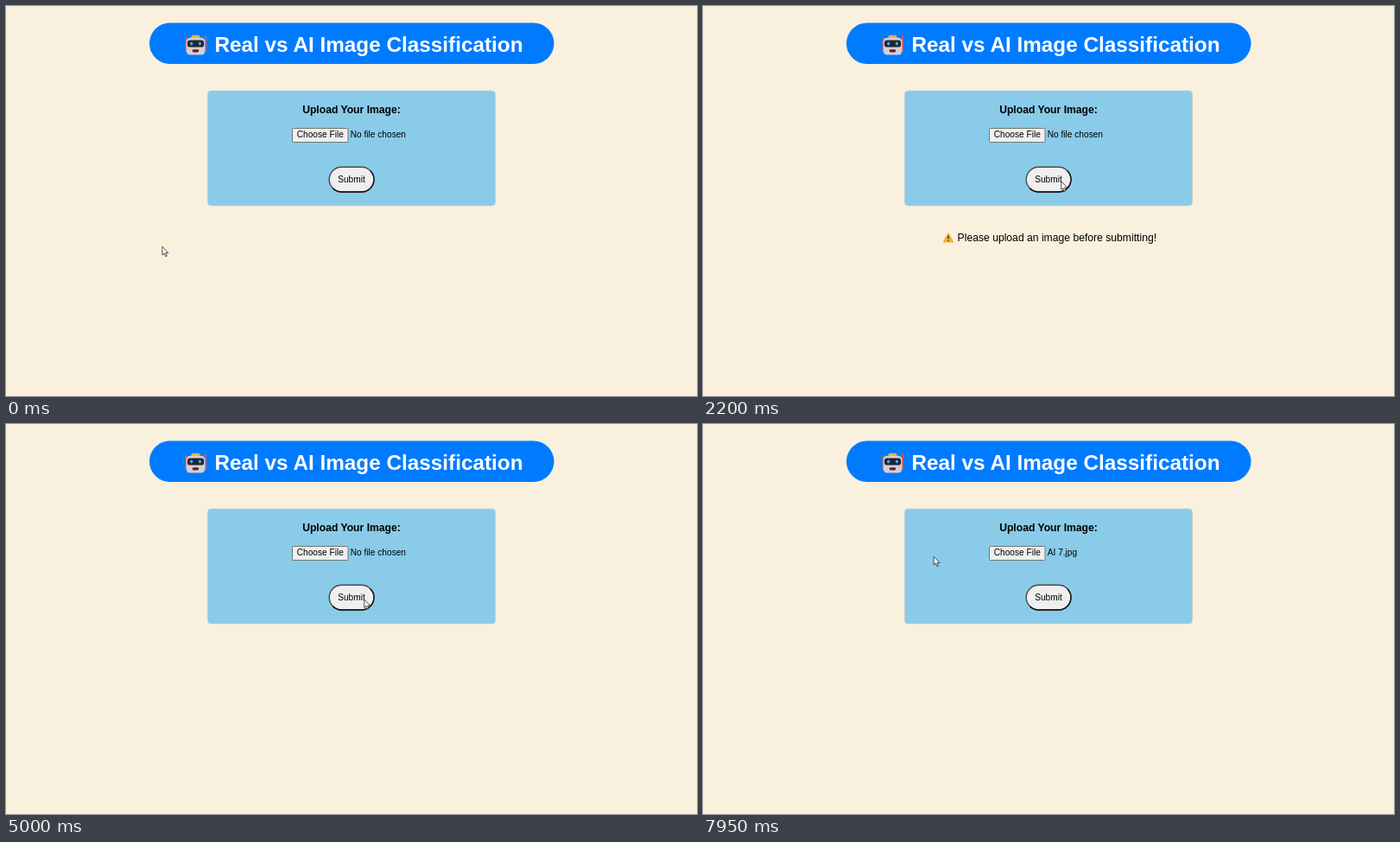
Recreate the animation shown at these times as an HTML page. Size 800x451 px, loop 8 s.

```html
<!DOCTYPE html>
<html lang="en">
<head>
<meta charset="utf-8">
<title>Image upload</title>
<style>
  html, body { margin: 0; width: 100%; height: 100%; overflow: hidden; background: #faf0de; }
  svg { display: block; width: 100vw; height: 100vh; }
  text { font-family: "Liberation Sans", Arial, sans-serif; font-size: 10.13px; }
  .title { font-size: 24.32px; font-weight: bold; fill: #fff; }
  .label { font-size: 12.16px; font-weight: bold; }
  .note { font-size: 12.16px; }
  .mid { text-anchor: middle; }
</style>
</head>
<body>
<svg viewBox="0 0 800 451">
  <rect width="800" height="451" fill="#faf0de"/>

  <rect x="166" y="19.5" width="468.5" height="47.5" rx="23.75" fill="#007bff"/>
  <g id="robot">
    <path d="M208.6 37V52M231 35V52" stroke="#e8574a" stroke-width="1.8" stroke-linecap="round"/>
    <rect x="214.5" y="33.7" width="10" height="5" rx="2" fill="#f9b13c"/>
    <rect x="208.8" y="36.8" width="21.6" height="19.8" rx="4.5" fill="#d5cfd6"/>
    <rect x="210" y="39.6" width="19.2" height="8" rx="3.2" fill="#1d2534"/>
    <ellipse cx="214.7" cy="43.5" rx="1.6" ry="2.1" fill="#48a9e0"/>
    <ellipse cx="224.5" cy="43.5" rx="1.6" ry="2.1" fill="#48a9e0"/>
    <rect x="215.8" y="50.2" width="7.4" height="3.2" rx="1.4" fill="#6e2029"/>
  </g>
  <text class="title" x="241.4" y="53.2">Real vs AI Image Classification</text>

  <rect x="233.6" y="98.1" width="332.8" height="132.8" rx="3.6" fill="#89cbe9" stroke="#c3cdca" stroke-width=".8"/>
  <text class="label mid" x="400" y="124.4">Upload Your Image:</text>

  <rect id="choose" x="331.5" y="141.5" width="64.5" height="16" rx=".8" fill="#efefef" stroke="#767676"/>
  <text class="mid" x="363.8" y="152.4">Choose File</text>
  <text id="file" x="398.8" y="152.4">No file chosen</text>

  <rect x="374.2" y="186.2" width="51.8" height="28.8" rx="14.4" fill="#efefef" stroke="#4c4c4c" stroke-width="1.4"/>
  <path d="M421.8 190.4A14.4 14.4 0 0 1 411.6 215H388.6A14.4 14.4 0 0 1 378.4 210.8" fill="none" stroke="#111" stroke-width="1.4"/>
  <text class="mid" x="400" y="204">Submit</text>

  <g id="warning">
    <path d="M284 263.2L289.3 272.8H278.7Z" fill="#f8b02f" stroke="#f8b02f" stroke-width="1.6" stroke-linejoin="round"/>
    <path d="M284 265.6V269.4M284 271V272.2" stroke="#3b2f2a" stroke-width="1.4"/>
    <text class="note" x="294.6" y="272">Please upload an image before submitting!</text>
  </g>

  <path id="cursor" d="M0 0V9.7L2.2 7.7L3.8 11.5L5.3 10.8L3.8 7.2H6.8Z" fill="#fff" stroke="#222" stroke-width=".8" stroke-linejoin="round"/>
</svg>
<script>
const LOOP = 8000;
const START = [181, 278.3];
const MOVES = [
  { from: 0, to: 250, point: [414.8, 202.8] },
  { from: 5200, to: 5500, point: [355.3, 148] },
  { from: 6850, to: 7200, point: [47, 147] },
  { from: 7850, to: 7950, point: [267.2, 153.3] }
];
const NOTE_SHOWN = 1600, FADE_FROM = 4050, FADE_TIME = 900, FILE_CHOSEN = 7400;

const [choose, file, warning, cursor] =
  ["choose", "file", "warning", "cursor"].map(id => document.getElementById(id));

const progress = (t, from, length) => Math.min(1, Math.max(0, (t - from) / length));
const smooth = p => p * p * (3 - 2 * p);

function cursorAt(t) {
  return MOVES.reduce((pos, { from, to, point }) => {
    const p = smooth(progress(t, from, to - from));
    return pos.map((v, i) => v + (point[i] - v) * p);
  }, START);
}

function render(t) {
  const [x, y] = cursorAt(t);
  cursor.setAttribute("transform", `translate(${x.toFixed(2)} ${y.toFixed(2)})`);

  const hover = x > 331 && x < 396.5 && y > 141 && y < 158;
  choose.setAttribute("fill", hover ? "#e5e5e5" : "#efefef");
  choose.setAttribute("stroke", hover ? "#4f4f4f" : "#767676");

  file.textContent = t < FILE_CHOSEN ? "No file chosen" : "AI 7.jpg";
  warning.setAttribute("opacity", t < NOTE_SHOWN ? 0 : 1 - smooth(progress(t, FADE_FROM, FADE_TIME)));
}

const began = performance.now();
function tick() {
  render((performance.now() - began) % LOOP);
  requestAnimationFrame(tick);
}
render(0);
requestAnimationFrame(tick);
</script>
</body>
</html>
```
